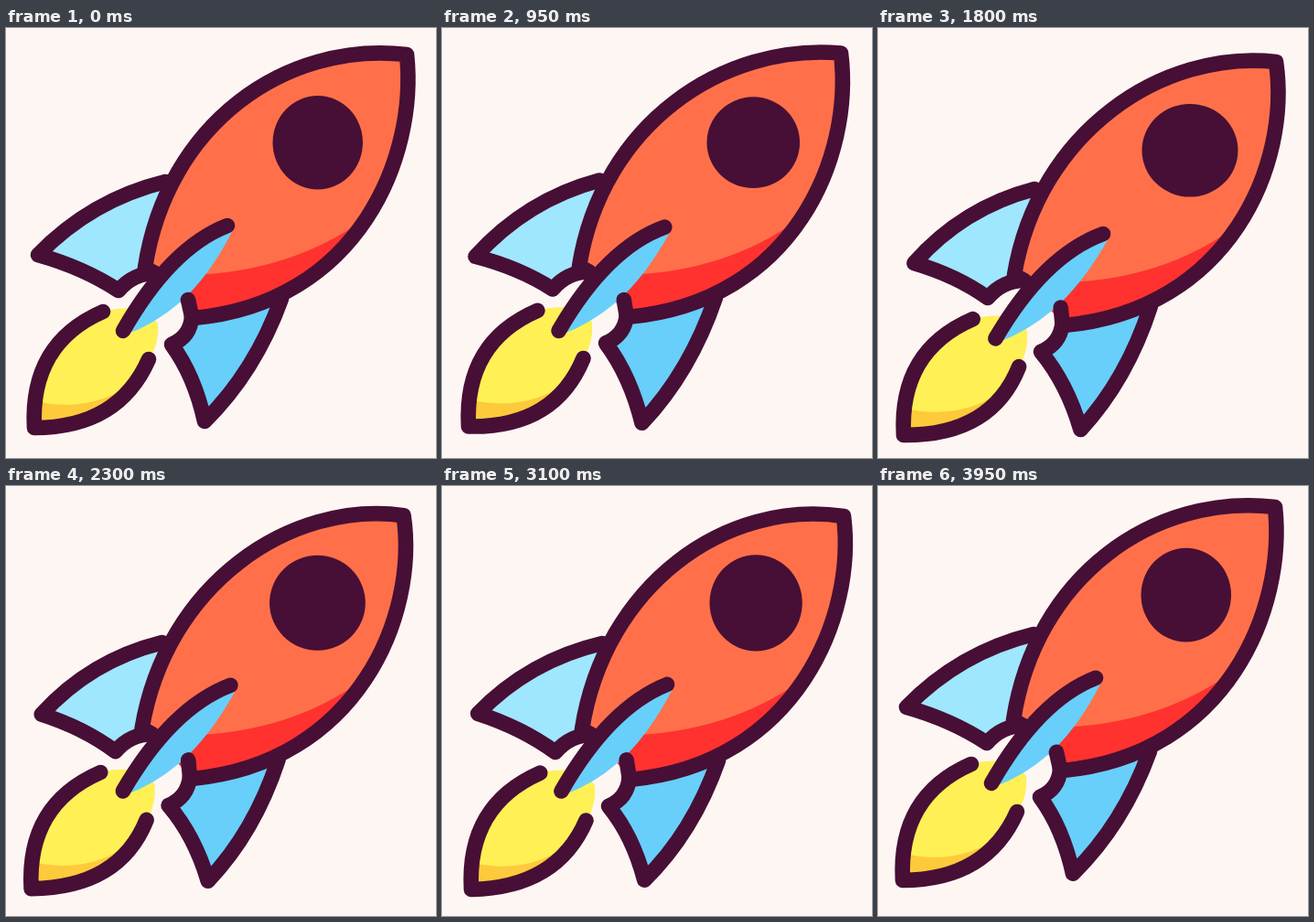
Recreate the animation shown at these times as an HTML page with a canvas. Size 470 by 470 pixels, loop 4000 ms.

```html
<!DOCTYPE html>
<html lang="en">
<head>
<meta charset="utf-8">
<title>Rocket</title>
<style>
  html, body { margin: 0; width: 100%; height: 100%; overflow: hidden; background: #fef6f3; }
  canvas { display: block; width: 100vmin; height: 100vmin; }
</style>
</head>
<body>
<canvas id="stage" width="470" height="470"></canvas>
<script>
const ctx = document.getElementById('stage').getContext('2d');
const SIZE = 470, LOOP = 4000, STEP = 50, TURN = 2 * Math.PI;
const INK = '#470f35', PAPER = '#fef6f3', LINE = 16.6;
const SWAY = 7, SWING = 550;

// Resting places of the shake: time, x, y
const rests = [
  [0, 0, 0], [550, -5, -4], [1350, 1, 1], [1800, -3, 8],
  [2750, -8, 7], [3450, 10, 1], [3950, -4, -6], [LOOP, 0, 0]
];

// Ease from rest to rest while swaying in whole figure-eights
function shakeAt(t) {
  const i = rests.findIndex(r => r[0] > t);
  const [t0, x0, y0] = rests[i - 1], [t1, x1, y1] = rests[i];
  const u = (t - t0) / (t1 - t0), e = (1 - Math.cos(Math.PI * u)) / 2;
  const a = TURN * u * Math.round((t1 - t0) / SWING);
  return [
    x0 + (x1 - x0) * e + SWAY * Math.sin(a),
    y0 + (y1 - y0) * e - SWAY * Math.sin(2 * a)
  ];
}

// Slow circular drift; each point follows it by its own weight
let drift = [0, 0];

function driftAt(t) {
  const a = TURN * t / LOOP;
  return [3.8 * (1 - Math.cos(a)), 3.3 * Math.sin(a)];
}

// Points are [x, y, weight]; segments hold 1 (line), 2 (quadratic) or 3 (cubic) points
const curves = ['lineTo', 'quadraticCurveTo', 'bezierCurveTo'];
const place = ([x, y, w = 0]) => [x + drift[0] * w, y + drift[1] * w];

function trace(start, ...segs) {
  const path = new Path2D();
  path.moveTo(...place(start));
  for (const seg of segs) path[curves[seg.length - 1]](...seg.flatMap(place));
  return path;
}

function fill(path, color) {
  ctx.fillStyle = color;
  ctx.fill(path);
}

function shade(path, clip, color) {
  ctx.save();
  ctx.clip(clip);
  fill(path, color);
  ctx.restore();
}

function outlined(path, color) {
  fill(path, color);
  ctx.stroke(path);
}

function flame() {
  const tip = [31, 437], top = [106, 310, .1], end = [156, 362, .15];
  const left = [[26, 345], tip], right = [[123, 437, .6], end];
  const area = trace(top, left, right, [[168, 345], [166, 323]], [[148, 299], top]);
  fill(area, '#fff056');
  shade(trace([25, 406], [[92, 424], [140, 386, .3]], [[160, 450]], [[20, 450]]), area, '#fdca3c');
  ctx.stroke(trace(top, left, right));
}

function sideFins() {
  outlined(trace([174, 168], [[93, 188, .4], [35, 248, 1]], [[85, 262, .5], [123, 287]],
    [[139, 268], [163, 268]]), '#9fe6ff');
  outlined(trace([301, 296], [[272, 376, .4], [217, 430, 1]], [[206, 380, .5], [181, 346]],
    [[202, 337], [203, 315, .2]]), '#67cffa');
}

function body() {
  const nose = [438, 29];
  const hull = trace([163, 268], [[152, 262]], [[176, 105, .3], [305, 14, 1.2], nose],
    [[450, 140, .6], [386, 300, .2], [206, 317, .1]]);
  fill(hull, '#ff704a');
  shade(trace([190, 270, .4], [[298, 270, .5], [380, 217, .3]], [[420, 340]], [[190, 340]]),
    hull, '#ff322f');
  ctx.stroke(hull);
}

function porthole() {
  const [l, b] = [291.5, 176.5], [r, t] = place([390, 74, .87]);
  const oval = new Path2D();
  oval.ellipse((l + r) / 2, (t + b) / 2, (r - l) / 2, (b - t) / 2, 0, 0, TURN);
  fill(oval, INK);
}

function middleFin() {
  const top = [242, 216, .95], low = [128, 331, .45];
  const spine = [[180, 240, .6], low];
  fill(trace(top, spine, [[131, 335, .45]], [[162, 324, .4], [190, 300, .5]],
    [[222, 272, .6], [248, 221, .95]]), '#67cffa');
  ctx.stroke(trace(top, spine));
  ctx.stroke(trace([199, 297, .5], [[203, 315, .2]]));
}

function draw(now) {
  const t = Math.floor((now % LOOP) / STEP) * STEP;
  drift = driftAt(t);
  ctx.fillStyle = PAPER;
  ctx.fillRect(0, 0, SIZE, SIZE);
  ctx.save();
  ctx.translate(...shakeAt(t));
  ctx.strokeStyle = INK;
  ctx.lineWidth = LINE;
  ctx.lineCap = ctx.lineJoin = 'round';
  for (const part of [flame, sideFins, body, porthole, middleFin]) part();
  ctx.restore();
}

const begin = performance.now();
function tick() {
  draw(performance.now() - begin);
  requestAnimationFrame(tick);
}
tick();
</script>
</body>
</html>
```
